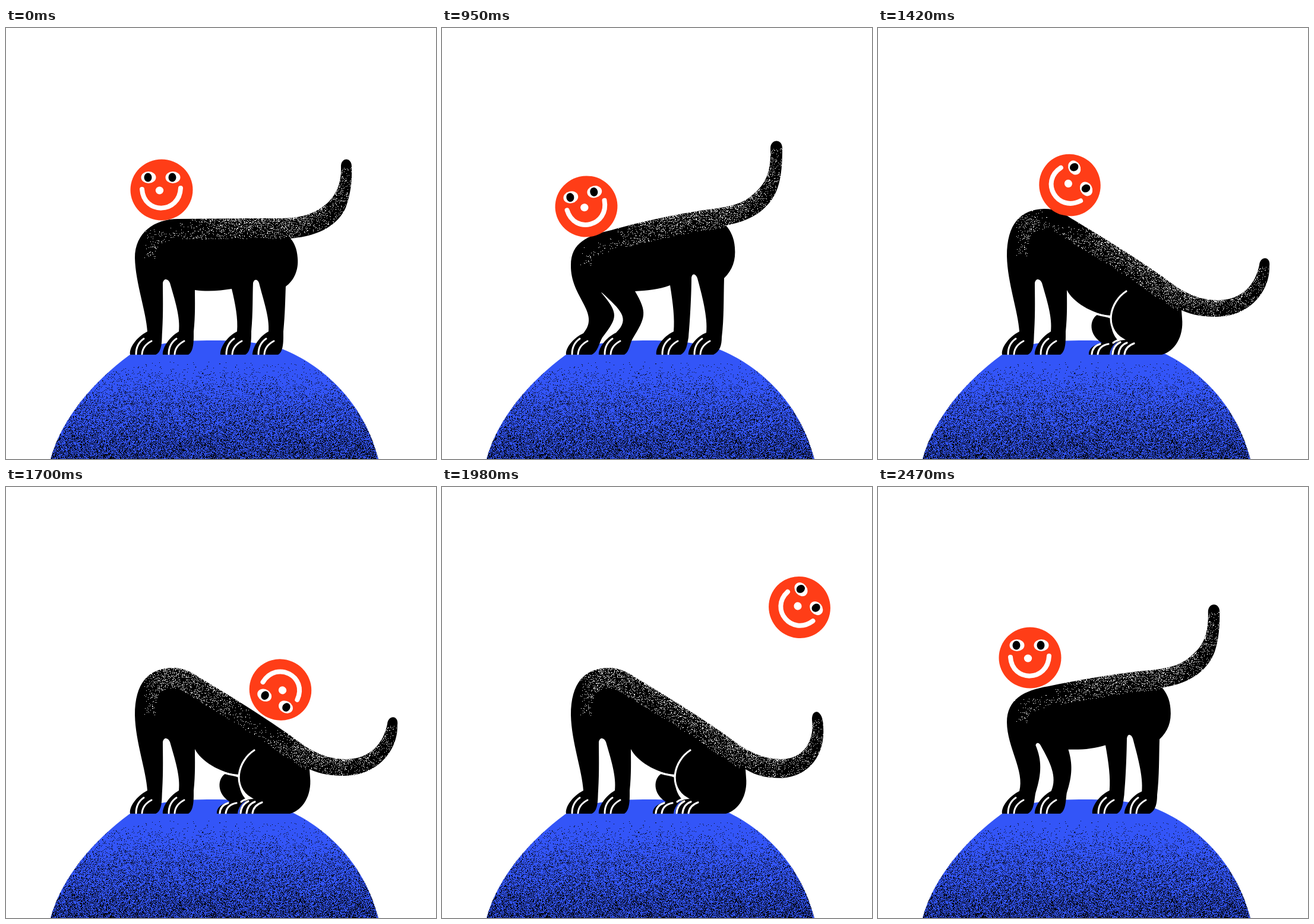
Write an HTML page with a canvas that moves like this. It is 724x727 px and loops after 2570 ms.

```html
<!DOCTYPE html>
<html lang="en">
<head>
<meta charset="utf-8">
<title>Rolling head</title>
<style>
  html, body { margin: 0; width: 100%; height: 100%; overflow: hidden; background: #fff; }
  canvas { display: block; width: 724px; height: 727px; }
</style>
</head>
<body>
<canvas id="stage" width="724" height="727"></canvas>
<script>
const W = 724, H = 727, LOOP = 2570;
const RED = '#ff3d17', BLUE = '#3355f8';
const ctx = document.getElementById('stage').getContext('2d');

// Outline sections, each in a straight and a crouched version with equal structure
const front = [
  `C218,430 236,478 238,512 C219,522 207,540 209,551 L252,551 C264,546 262,525 263,512
   C265,480 264,450 264,430 C266,421 273,423 276,430 C284,458 294,488 291,512
   C274,522 263,540 264,551 L307,551 C317,545 316,525 316,512 C319,485 318,460 318,442`,
  `C216,455 268,480 238,515 C222,522 207,540 209,551 L252,551 C263,546 264,532 270,522
   C296,488 298,482 268,446 C268,446 269,446 270,447 C300,475 318,490 293,514
   C276,522 263,540 264,551 L307,551 C316,546 316,532 321,524 C343,488 346,480 325,444`
];
const hind = [
  `C340,445 362,443 380,440 C386,465 391,490 389,512 C371,521 360,540 361,551 L403,551
   C413,546 413,525 413,512 C416,480 415,450 416,430 C418,422 424,424 426,430
   C433,458 444,488 442,512 C425,521 415,540 415,551 L458,551 C468,546 467,525 467,512
   C470,480 470,460 471,436 C485,426 493,408 491,388 C490,372 485,362 479,355`,
  `C345,443 365,441 384,434 C389,465 392,490 390,512 C371,521 359,540 361,551 L402,551
   C412,546 413,532 415,522 C418,490 420,445 420,422 C421,413 427,414 430,422
   C437,448 448,488 445,514 C428,520 414,540 415,551 L457,551 C468,546 471,534 471,522
   C475,490 474,455 475,422 C489,408 495,392 493,370 C492,354 486,342 478,333`
];
const tail = [
  'C530,351 560,330 572,303 C580,280 583,260 582,235 C583,217 563,217 564,235',
  'C530,324 555,298 565,270 C572,250 573,225 573,203 C573,186 553,187 553,203'
];
const back = [
  'C565,262 556,287 530,304 C505,320 480,322 440,321 C390,321 340,322 290,322 C250,322 217,345 217,388',
  'C554,240 548,262 520,284 C500,301 470,303 436,308 C390,315 330,328 285,341 C245,350 217,362 217,400'
];

// Sitting: rest, swung up, pressed down
const sitHind = `C328,462 360,482 392,486 C392,505 402,517 411,525 C400,530 393,540 393,551
  L478,551 C500,545 515,520 512,490 L511,476`;
const sitTail = [
  'C530,485 550,487 572,487 C625,486 660,445 659,402 C662,384 643,384 642,400',
  'C530,488 550,491 572,491 C620,488 645,450 642,405 C642,373 622,373 623,393',
  'C525,492 545,508 578,508 C630,505 675,470 674,420 C676,402 658,402 657,418'
];
const sitBack = [
  'C636,430 615,459 573,459 C535,460 505,440 480,420',
  'C628,428 608,459 573,459 C535,460 505,440 480,420',
  'C650,450 622,480 578,480 C540,478 508,448 480,420'
];
const slope = ' C420,378 365,345 325,321 C312,312 300,305 280,305 C240,306 217,330 217,385';
const farLeg = `M392,490 C392,505 395,518 405,528 C395,533 390,545 390,551 L355,551
  C354,542 362,534 377,531 C355,518 355,492 370,483 Z`;
const sitLines = `M362,480 Q376,486 392,486.500 M418,444 C390,462 380,506 412,525 Q402,526 396,531
  M360,550 Q361,537 374,533 M370,550 Q372,536 388,533
  M395,550 Q396,536 408,530 M405,550 Q407,535 419,531 M415,550 Q417,537 431,532`;

// start, front bend, rear bend, head x, head y, head turn, eyelid
const standing = [
  [0, 0, 0], [100, 0, 0, .5], [170, 0, 0, 1], [240, 0, 0], [310, 0, 0, .5], [380, 0, 0, 1], [450, 0, 0]
].map(([t, a, b, lid = 0]) => [t, a, b, 262, 273, 0, lid]).concat([
  [950, 1, 1, 243, 301, -13],
  [1050, 1.35, 1.5, 232, 317, -20],
  [1250, -.1, -.3, 264, 262, 8],
  [2400, 1.2, 1.1, 240, 305, 700],
  [2470, .35, .75, 256, 288, 720]
]);
// start, tail swing, tail dip, head x, head y, head turn
const sitting = [
  [1350, -2, 0, 292, 254, 38],
  [1420, 0, 0, 323, 265, 61],
  [1490, 0, 0, 352, 280, 95],
  [1560, 0, 0, 387, 299, 133],
  [1630, 0, 0, 424, 320, 171],
  [1700, 0, 0, 462, 342, 209],
  [1770, 0, .2, 505, 372, 255],
  [1840, 0, 1, 592, 424, 305],
  [1910, .7, 0, 624, 312, 358],
  [1980, 1, 0, 602, 203, 411],
  [2050, .6, 0, 548, 136, 465],
  [2120, .2, 0, 484, 100, 519],
  [2190, .2, 0, 417, 94, 573],
  [2260, .4, 0, 352, 115, 624],
  [2330, .4, 0, 290, 181, 665]
];
const pose = sit => ([t, a, b, x, y, turn, lid = 0]) => ({ sit, t, a, b, x, y, turn, lid });
const steps = [...standing.map(pose(false)), ...sitting.map(pose(true))].sort((p, q) => p.t - q.t);

function mix(p, q, k) {
  const to = q.match(/[\d.]+/g);
  let i = 0;
  return p.replace(/[\d.]+/g, n => (+n + (to[i++] - n) * k).toFixed(2));
}
const blend = (pair, k) => mix(pair[0], pair[1], k);
const lastPoint = path => path.trim().split(/[\sCLM]+/).pop();

function random(seed) {
  return () => {
    seed = (seed + 0x6D2B79F5) | 0;
    let r = Math.imul(seed ^ (seed >>> 15), 1 | seed);
    r = (r + Math.imul(r ^ (r >>> 7), 61 | r)) ^ r;
    return ((r ^ (r >>> 14)) >>> 0) / 4294967296;
  };
}
const ramp = (v, lo, hi) => Math.min(1, Math.max(0, (v - lo) / (hi - lo)));

function makeHill() {
  const layer = document.createElement('canvas');
  layer.width = W;
  layer.height = H;
  const g = layer.getContext('2d'), rnd = random(7);
  g.fillStyle = BLUE;
  const shape = new Path2D(`M75,727 C95,655 150,595 206,553 C235,532 290,527 350,527
    C400,527 450,533 478,547 C545,578 605,640 627,727 Z`);
  g.fill(shape);
  g.clip(shape);
  g.fillStyle = '#000';
  for (let y = 562; y < H; y++) {
    const p = .5 * Math.pow((y - 560) / 165, 1.2);
    for (let x = 70; x < 632; x++) if (rnd() < p) g.fillRect(x, y, 1, 1);
  }
  return layer;
}
const hill = makeHill();

function stroke(path, width) {
  ctx.strokeStyle = '#fff';
  ctx.lineWidth = width;
  ctx.lineCap = 'round';
  ctx.stroke(new Path2D(path));
}

function oval(x, y, rx, ry, color) {
  ctx.fillStyle = color;
  ctx.beginPath();
  ctx.ellipse(x, y, rx, ry, 0, 0, Math.PI * 2);
  ctx.fill();
}

// White specks along the top edge, missing in the shade of the head
function drawGrain(edge, outline, head) {
  const line = document.createElementNS('http://www.w3.org/2000/svg', 'path');
  line.setAttribute('d', edge);
  const length = line.getTotalLength(), rnd = random(31), pts = [];
  for (let s = 0; s <= length; s += 2) pts.push(line.getPointAtLength(s));
  ctx.save();
  ctx.clip(outline);
  ctx.fillStyle = '#fff';
  for (let n = length * 6; n > 0; n--) {
    const u = rnd() * (pts.length - 1), i = Math.floor(u);
    const p = pts[i], q = pts[i + 1];
    const dx = q.x - p.x, dy = q.y - p.y, len = Math.hypot(dx, dy) || 1;
    const depth = 34 * Math.pow(rnd(), 1.5);
    const x = p.x + dx * (u - i) + dy / len * depth;
    const y = p.y + dy * (u - i) - dx / len * depth;
    const light = ramp(Math.hypot(x - head.x, y - head.y), 62, 110)
      * ramp(x, 228, 265) * (.35 + .65 * ramp(u * 2, 0, 110));
    if (rnd() < light) ctx.fillRect(Math.round(x), Math.round(y), 1, 1);
  }
  ctx.restore();
}

function drawBody(p) {
  let legs, rear, tip, top;
  if (p.sit) {
    const bend = set => mix(mix(set[0], set[1], p.a), set[2], p.b);
    legs = front[0];
    rear = sitHind;
    tip = bend(sitTail);
    top = bend(sitBack) + slope;
  } else {
    legs = blend(front, p.a);
    rear = blend(hind, p.b);
    tip = blend(tail, p.b);
    top = blend(back, p.b);
  }
  const outline = new Path2D(`M${lastPoint(top)} ${legs} ${rear} ${tip} ${top} Z`);
  ctx.fillStyle = '#000';
  if (p.sit) ctx.fill(new Path2D(farLeg));
  ctx.fill(outline);
  drawGrain(`M${lastPoint(tip)} ${top}`, outline, p);
  for (const x of p.sit ? [209, 264] : [209, 264, 361, 415]) {
    stroke(`M${x + 10},550 Q${x + 10},533 ${x + 23},524 M${x + 20},550 Q${x + 21},536 ${x + 36},528`, 3);
  }
  if (p.sit) stroke(sitLines, 3.2);
}

function drawHead({ x, y, turn, lid }) {
  const open = Math.max(.14, 1 - lid);
  ctx.save();
  ctx.translate(x, y);
  ctx.rotate(turn * Math.PI / 180);
  oval(0, 0, 52.5, 51.5, RED);
  for (const ex of [-22, 19]) {
    oval(ex, -21, 12.5, 10 * open, '#fff');
    oval(ex - 1, -21, 6.5, 7.5 * open, '#000');
  }
  oval(-3.5, 1, 6.7, 6.5, '#fff');
  stroke('M-33,-1 C-30,42 30,41 32,-3', 8);
  ctx.restore();
}

function draw(p) {
  ctx.fillStyle = '#fff';
  ctx.fillRect(0, 0, W, H);
  ctx.drawImage(hill, 0, 0);
  drawBody(p);
  drawHead(p);
}

const start = performance.now();
let shown;
function tick() {
  const t = (performance.now() - start) % LOOP;
  const now = steps.filter(p => p.t <= t).pop();
  if (now !== shown) draw(shown = now);
  requestAnimationFrame(tick);
}
tick();
</script>
</body>
</html>
```
